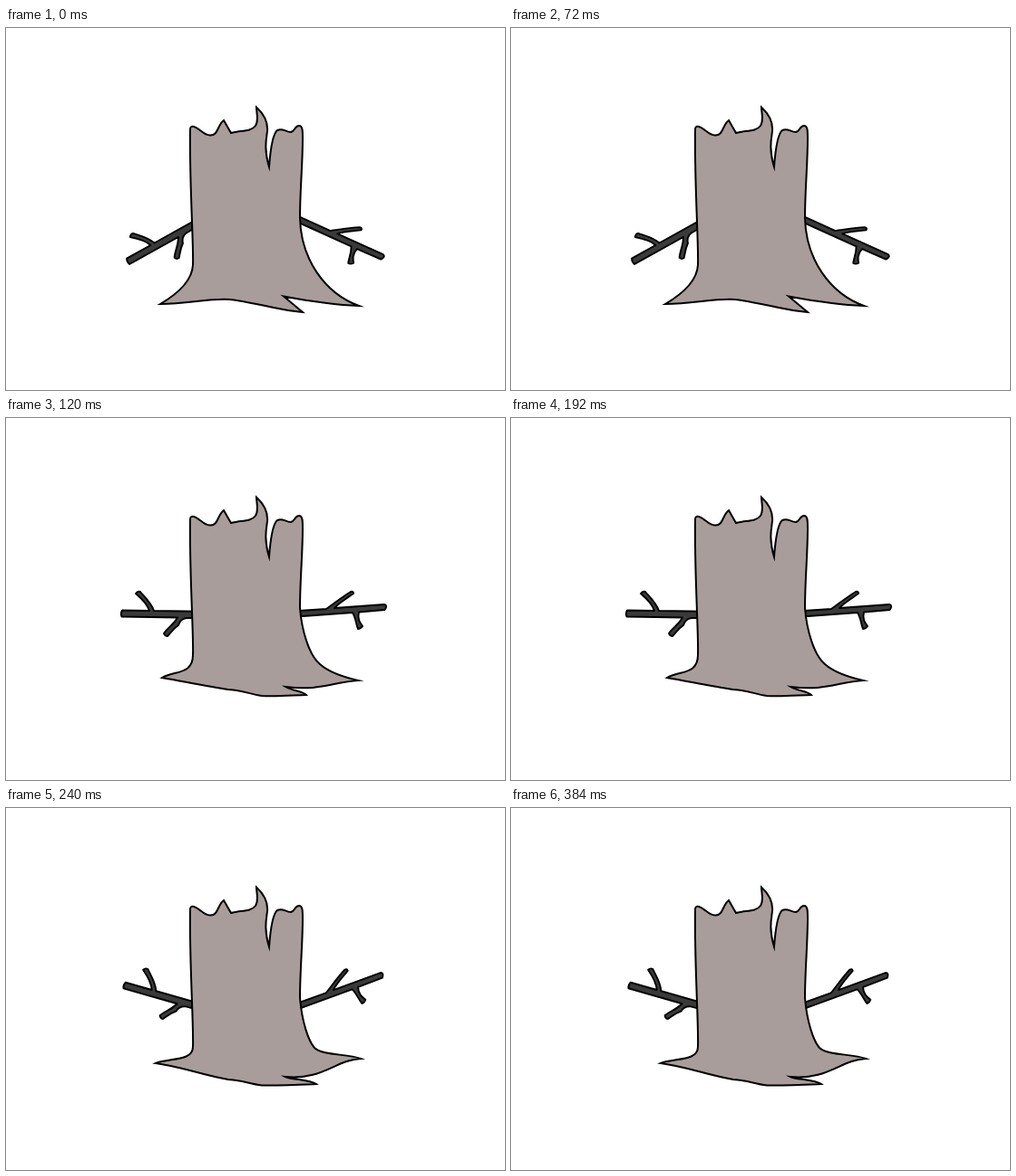
Recreate the animation shown at these times as an HTML page. Size 550 px wide and 400 px high, loop 480 ms.

```html
<!DOCTYPE html>
<html lang="en">
<head>
<meta charset="utf-8">
<title>Tree stump</title>
<style>
html, body { margin: 0; width: 100%; height: 100%; overflow: hidden; background: #fff; }
svg { display: block; width: 550px; height: 400px; }
path { stroke: #000; stroke-width: 2; stroke-miterlimit: 10; }
.branch { fill: #3a3a3a; stroke-width: 1.9; stroke-linejoin: round; }
#trunk { fill: #a89d9b; }
</style>
</head>
<body>
<svg viewBox="0 0 550 400">
  <path id="left" class="branch" d="M230 214L163 213C160 204 153 198 148 192Q145 191 143 194C150 200 156 206 158 213L128 212.5Q126 216 127.500 219.500L189 220.500C185 228 178 232 174 238Q175 241 178 241C181 238 184 233 190 229Q192 222 199 221H230Z"/>
  <path id="right" class="branch" d="M300 214.500L353 211C359 207 370 198 380 192Q383 191 383 194C376 199 366 205 362 210L417 206Q421 207 417.500 212L389 214.500C387 222 390 226 393 230Q391 233 388 233C386 229 386 222 382 215L300 221Z"/>
  <path id="trunk"/>
</svg>
<script>
const el = id => document.getElementById(id);

// Broken top edge, from the left side over to the right side
const crown = "M203 112Q203 108 207 109C214 111 218 119 225 118.500C234 119 233 107 240 102L248 116C258 113 270 115 275 108C279 102 276 94 276 87.500C283 94 289 103 288 114C287 122 284 134 290 153.500C291 140 293 118 299 113C305 110 308 115 314 115C319 114 318 108 323 108C327 108 327 114 327 122C327 150 324 180 324 210";
const leftSide = "C207 240 202 170 203 112Z";

// left, right: [angle, dx, dy] of each branch; roots: outline from right to left
const poses = [
  { until: 120, left: [-30, -3, 3], right: [28.5, 5, -1],
    roots: "C325 255 351 293 389 307C360 306 330 301 306 296.500L327 314C298 312 276 303 247 300C227 298 200 305 170 305C187 295 205 280 206 262" },
  { until: 240, left: [0, 0, 0], right: [0, 0, 0],
    roots: "C326 235 334 262 346 272C356 281 375 287 388 290C360 292 345 302 308 297C314 301 328 302 331 306C320 306 300 308 282 307C268 305 262 301 245 300C225 297 200 292 172 287C185 279 206 284 206 262" },
  { until: 480, left: [15, 0, 0], right: [-16, 2, 1],
    roots: "C326 235 333 257 340 265C350 274 375 271 391 277C364 278 349 301 308 297C314 300 335 300 342 305C320 306 300 307 282 306.500C268 305 262 301 245 300C215 295 195 286 165 282C180 276 206 280 206 264" }
];

function turn(id, [angle, dx, dy], x, y) {
  el(id).setAttribute("transform", `translate(${dx} ${dy}) rotate(${angle} ${x} ${y})`);
}

function draw() {
  const t = performance.now() % 480;
  const pose = poses.find(p => t < p.until);
  turn("left", pose.left, 205, 217);
  turn("right", pose.right, 325, 216);
  el("trunk").setAttribute("d", crown + pose.roots + leftSide);
  requestAnimationFrame(draw);
}
draw();
</script>
</body>
</html>
```
